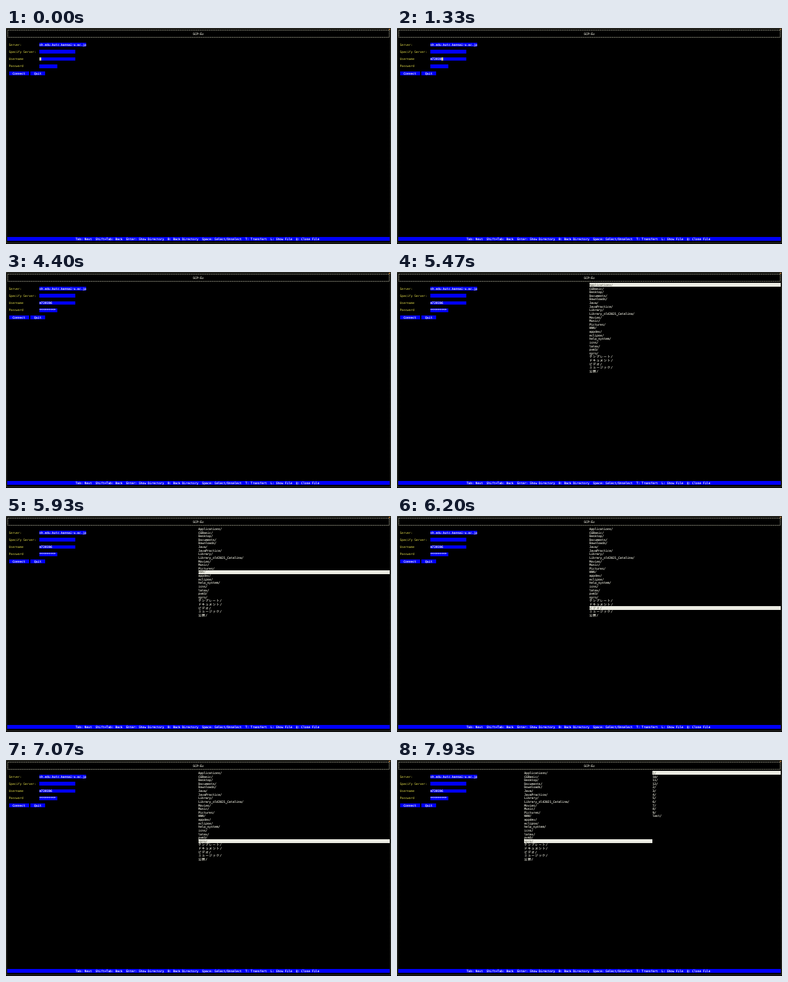
These frames come from a looping animation (600 by 338 pixels, 8 s). An HTML page:

```html
<!DOCTYPE html>
<html lang="en">
<head>
<meta charset="utf-8">
<title>SCP-Ez</title>
<style>
  html, body { margin: 0; width: 100%; height: 100%; overflow: hidden; background: #000; }
  svg { display: block; width: 100vw; height: 100vh; }
  rect { shape-rendering: crispEdges; }
  text {
    font-family: "DejaVu Sans Mono", "Noto Sans CJK JP", "Noto Sans CJK", monospace;
    font-size: 4.688px; fill: #e6e04a; stroke-width: .12px;
    white-space: pre; text-rendering: geometricPrecision;
  }
  .white { fill: #fff; stroke: #fff; }
  .pale { fill: #e4e4d8; stroke: #e4e4d8; }
  .dark { fill: #4c4c40; }
  .wide { font-family: "Noto Sans CJK JP", "Noto Sans CJK", sans-serif; letter-spacing: .955px; }
  .frame, .edge { fill: none; shape-rendering: auto; }
  .frame { stroke: #a8a894; stroke-width: .8; stroke-dasharray: 2.2 .62; }
  .edge { stroke: #383830; stroke-width: 1.6; stroke-dasharray: 1.4 .6; }
</style>
</head>
<body>
<svg id="stage" viewBox="0 0 600 338" preserveAspectRatio="none"></svg>
<script>
const NS = "http://www.w3.org/2000/svg";
const stage = document.getElementById("stage");
const CELL = 2.82, ROW = 5.63, LOOP = 8000;
const BLUE = "#0000fa", BAR = "#ebebe2", CURSOR = "#c2c2ae";
const LEFT = 4.5, FIELD = 52;

const dirs = ("Applications CGBasic Desktop Documents Downloads Java JavaPractice Library " +
  "Library_old2021_Catalina Movies Music Pictures WWW appdev eclipse help_system icns latex " +
  "pvm3 spro テンプレート ドキュメント ビデオ ミュージック 公開").split(" ");
const subdirs = "1 10 11 12 2 3 4 5 6 7 8 9 last".split(" ");

const USER = "m728196";
const userKeys = [930, 1000, 1070, 1200, 1270, 1330, 1400];
const passKeys = [2470, 2600, 2730, 3000, 3070, 3130, 3200, 3330, 3400];
const upKeys = [6470, 6600, 6730, 6870, 7000];
const TO_PASS = 1800, TO_BUTTON = 3600, LISTED = 5470, OPENED = 7400;

function add(tag, attrs, parent = stage) {
  const el = document.createElementNS(NS, tag);
  for (const key in attrs) el.setAttribute(key, attrs[key]);
  return parent.appendChild(el);
}

// Row 0 is the first line below the title box.
const rowTop = row => 20.3 + (row - .5) * ROW;

function box(x, row, width, fill, parent) {
  return add("rect", { x, y: rowTop(row), width, height: ROW, fill }, parent);
}

function label(x, row, string, cls = "", parent) {
  const el = add("text", { x, y: rowTop(row) + 4.4, class: cls }, parent);
  el.textContent = string;
  return el;
}

function field(row, name, cells, value = "") {
  label(LEFT, row, name);
  box(FIELD, row, cells * CELL, BLUE);
  return label(FIELD, row, value, "white");
}

function button(x, cells, name) {
  box(x, 9, cells * CELL, BLUE);
  label(x + 2 * CELL, 9, name, "white");
}

function makeList(x, names, width) {
  const group = add("g", {});
  const bar = box(x, 0, width, BAR, group);
  const lines = names.map((name, i) => {
    const line = label(x, i, "", "pale", group);
    const part = add("tspan", name.charCodeAt(0) > 255 ? { class: "wide" } : {}, line);
    part.textContent = name;
    add("tspan", {}, line).textContent = "/";
    return line;
  });
  return (shown, selected) => {
    group.style.display = shown ? "" : "none";
    bar.setAttribute("y", rowTop(selected));
    lines.forEach((line, i) => line.setAttribute("class", i === selected ? "dark" : "pale"));
  };
}

add("rect", { width: 600, height: 338, fill: "#000" });
add("rect", { x: .9, y: .9, width: 598.2, height: 335.4, class: "edge" });
add("rect", { x: 2.8, y: 3.4, width: 594.4, height: 11.2, class: "frame" });
add("circle", { cx: 597.6, cy: 2.2, r: 1, fill: "#e08a30" });
label(291.3, -2, "SCP-Ez", "pale");

field(1, "Server:", 26, "sh.edu.kutc.kansai-u.ac.jp");
field(3, "Specify Server:", 20);
const user = field(5, "Username", 20);
const pass = field(7, "Password", 10);
button(LEFT, 11, "Connect");
button(LEFT + 12 * CELL, 8, "Quit");

box(2, 55, 596.4, BLUE);
label(108.5, 55, [
  "Tab: Next", "Shift+Tab: Back", "Enter: Show Directory", "B: Back Directory",
  "Space: Select/Unselect", "T: Transfert", "L: Show File", "Q: Close File"
].join("  "), "white");

const cursor = box(FIELD, 5, CELL, CURSOR);
const wideList = makeList(299.7, dirs, 298.6);
const midList = makeList(198.3, dirs, 199.9);
const subList = makeList(398.2, subdirs, 200.1);

const pressed = (keys, t) => keys.filter(key => t >= key).length;

function selectedDir(t) {
  const down = 2 * Math.floor((t - LISTED + 5) / (1000 / 15));
  return Math.max(0, Math.min(dirs.length - 1, down)) - pressed(upKeys, t);
}

function draw(t) {
  const userCount = pressed(userKeys, t), passCount = pressed(passKeys, t);
  user.textContent = USER.slice(0, userCount);
  pass.textContent = "*".repeat(passCount);

  const onPass = t >= TO_PASS;
  cursor.style.display = t < TO_BUTTON ? "" : "none";
  cursor.setAttribute("x", FIELD + CELL * (onPass ? passCount : userCount));
  cursor.setAttribute("y", rowTop(onPass ? 7 : 5));

  const row = selectedDir(t);
  wideList(t >= LISTED && t < OPENED, row);
  midList(t >= OPENED, row);
  subList(t >= OPENED, 0);
}

const start = performance.now();
function tick() {
  draw((performance.now() - start) % LOOP);
  requestAnimationFrame(tick);
}
tick();
</script>
</body>
</html>
```
